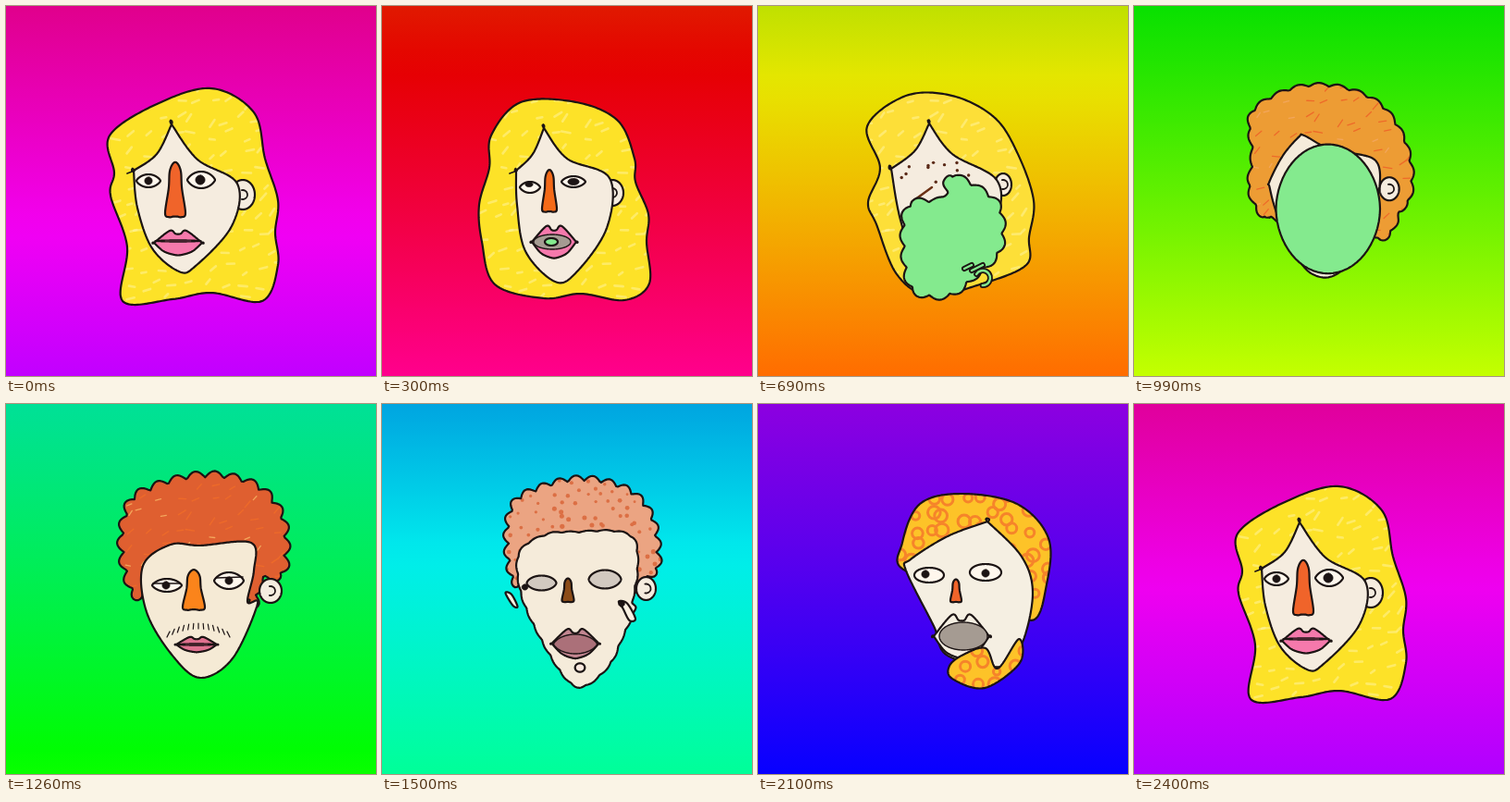
These frames come from a looping animation (400x400 px, 2430 ms). An HTML page with a canvas:

```html
<!DOCTYPE html>
<html lang="en">
<head>
<meta charset="utf-8">
<title>Shifting face</title>
<style>
html, body { margin: 0; height: 100%; overflow: hidden; }
canvas { display: block; width: 100vw; height: 100vh; }
</style>
</head>
<body>
<canvas width="400" height="400"></canvas>
<script>
const ctx = document.querySelector('canvas').getContext('2d');
const LOOP = 2430, LAST = 2400, STEP = 30, N = 300, TAU = 2 * Math.PI;
const INK = '#1c1414', SKIN = '#f5ecdf', YELLOW = '#fde228', WHITE = '#fff7ed', PINK = '#f579ac',
  GREY = '#a59b92', GREEN = '#84ea8e', GOLD = '#fdc328', ORANGE = '#f0642a';

const lerp = (a, b, k) => a + (b - a) * k;
const mix = (a, b, k) => a.map((v, i) => lerp(v, b[i], k));
const range = (n, f) => Array.from({ length: n }, (_, i) => f(i));

let seed = 7;
const random = () => (seed = seed * 16807 % 2147483647) / 2147483647;

// ---- Curves

function spline(p) {
  const n = p.length;
  return p.flatMap((b, i) => {
    const a = p[(i + n - 1) % n], c = p[(i + 1) % n], d = p[(i + 2) % n];
    return range(12, k => {
      const s = k / 12;
      return b.map((v, j) => v + .5 * s * (c[j] - a[j] +
        s * (2 * a[j] - 5 * v + 4 * c[j] - d[j] + s * (3 * (v - c[j]) + d[j] - a[j]))));
    });
  });
}

// N evenly spaced points from above the middle, with optional scallops along the edge
function shape(color, curve, bumps = 0, size = 0) {
  const middle = j => {
    const v = curve.map(p => p[j]);
    return (Math.min(...v) + Math.max(...v)) / 2;
  };
  const center = [middle(0), middle(1)];
  const off = p => p[1] < center[1] ? Math.abs(p[0] - center[0]) : Infinity;
  const start = curve.reduce((best, p, i) => off(p) < off(curve[best]) ? i : best, 0);
  const p = [...curve.slice(start), ...curve.slice(0, start + 1)];
  const dist = [0];
  for (let i = 1; i < p.length; i++)
    dist.push(dist[i - 1] + Math.hypot(p[i][0] - p[i - 1][0], p[i][1] - p[i - 1][1]));
  let j = 0;
  const even = range(N, i => {
    const d = i / N * dist.at(-1);
    while (dist[j + 1] < d) j++;
    return mix(p[j], p[j + 1], (d - dist[j]) / (dist[j + 1] - dist[j] || 1));
  });
  const points = even.map(([x, y], i) => {
    const a = even.at(i - 2), b = even[(i + 2) % N];
    const dx = b[0] - a[0], dy = b[1] - a[1];
    const k = size * (Math.abs(Math.sin(Math.PI * bumps * i / N)) - .5) / (Math.hypot(dx, dy) || 1);
    return [x + dy * k, y - dx * k];
  });
  return { color: [1, 3, 5].map(i => parseInt(color.slice(i, i + 2), 16)), points, center };
}

// Closed curve through "x,y" pairs; a repeated pair makes a corner
const through = (color, pairs, ...bumps) =>
  shape(color, spline(pairs.split(' ').map(pair => pair.split(',').map(Number))), ...bumps);
const oval = (color, x, y, rx, ry, pinch = 0) => shape(color, range(64, i => {
  const a = i / 64 * TAU, s = Math.sin(a);
  return [x + rx * Math.cos(a), y + ry * s * Math.abs(s) ** pinch];
}));
const eye = (x, y, rx, ry) => oval(WHITE, x, y, rx, ry, .5);
const pupil = (x, y, rx, ry) => oval(INK, x, y, rx, ry);

// Left-right symmetric shape from its right half, top to bottom
const mirrored = (color, half, x, y, w, h) => {
  const left = half.map(([u, v]) => [-u, v]).reverse();
  return shape(color, spline([...half, ...left].map(([u, v]) => [x + u * w, y + v * h])));
};
const nose = (color, ...box) => mirrored(color, [[.2, 0], [.55, .15], [.65, .45], [1, .9], [.6, .97], [.2, .96]], ...box);
const lips = (color, ...box) => mirrored(color, [[.1, -.75], [.35, -1], [1, 0], [1, 0], [.6, .7], [.15, 1]], ...box);

// ---- Parts in drawing order, each with its poses by time; null is shrunk away

const parts = {
  hair: {
    0: through(YELLOW, '163,106 222,89 268,115 280,165 294,210 291,245 294,280 277,319 222,310 180,317 126,319 131,260 113,205 117,180 112,140'),
    300: through(YELLOW, '150,104 210,104 255,124 273,165 274,190 288,225 286,255 289,300 262,318 215,311 175,316 122,301 108,255 105,215 116,175 118,140'),
    690: through('#fddf38', '160,97 210,97 255,120 280,158 298,210 293,250 290,280 240,301 185,313 150,290 128,236 119,212 132,175 118,130'),
    1260: through('#df5f30', '145,95 210,76 268,86 298,118 304,160 298,186 278,190 271,215 261,214 250,190 160,185 150,206 136,204 124,160 128,120', 28, 7),
    1740: through('#f6e9d4', '149,110 168,96 218,84 268,101 290,135 296,185 270,190 160,185 146,178 144,145', 28, 5),
    2100: through(GOLD, '156,150 175,108 220,97 280,108 314,145 312,195 296,234 250,200 159,180')
  },
  ear: {
    0: oval(SKIN, 256, 204, 13, 16), 300: oval(SKIN, 249, 202, 12, 14), 690: oval(SKIN, 265, 193, 9, 12),
    1260: oval(SKIN, 286, 202, 12, 13), 1740: oval(SKIN, 285, 197, 9, 12), 2100: null
  },
  face: {
    0: through(SKIN, '179,128 179,128 207,166 250,192 244,238 205,281 187,287 158,262 142,218 138,178 138,178 163,160'),
    300: through(SKIN, '175,132 175,132 200,165 246,186 243,240 210,288 187,298 155,265 146,215 145,178 145,178 163,160'),
    690: through(SKIN, '185,127 185,127 210,160 258,188 258,230 225,285 180,300 155,235 144,176 144,176 170,156'),
    1260: through('#f5ead5', '210,153 265,150 268,180 261,214 272,216 245,275 210,296 180,272 152,225 148,175 178,152'),
    1740: through(SKIN, '200,125 265,128 284,165 280,215 258,262 245,292 212,318 194,295 172,245 150,190 150,145', 26, 3),
    2100: through('#f5efe2', '248,127 248,127 285,165 297,205 285,260 262,284 205,272 190,240 160,180 165,168 205,143')
  },
  eyeL: {
    0: eye(154, 189, 13, 7), 300: eye(160, 196, 11, 6), 690: null, 1260: eye(174, 196, 16, 7),
    1740: oval(GREY, 171, 191, 16, 9), 2100: oval(WHITE, 185, 185, 16, 8)
  },
  eyeR: {
    0: eye(211, 188, 15, 9), 300: eye(207, 190, 13, 6), 690: null, 1260: eye(241, 191, 16, 9),
    1740: oval(GREY, 241, 188, 19, 11), 2100: oval(WHITE, 246, 182, 17, 9)
  },
  ballL: { 1260: null, 1740: through('#f9f1e2', '127,197 140,200 153,226 143,224'), 2100: null },
  ballR: { 1260: null, 1740: through('#f9f1e2', '247,203 265,207 283,240 270,244 256,218'), 2100: null },
  pupilL: {
    0: pupil(154, 189, 4, 4), 300: pupil(159, 193, 4, 2.5), 690: null, 1260: pupil(173, 196, 4, 4),
    1740: pupil(136, 200, 2.5, 2), 2100: pupil(181, 184, 4, 4)
  },
  pupilR: {
    0: pupil(210, 188, 5, 5), 300: pupil(207, 190, 6, 3.5), 690: null, 1260: pupil(241, 191, 4, 4),
    1740: pupil(277, 241, 2.5, 2), 2100: pupil(246, 183, 4, 4)
  },
  nose: {
    0: nose(ORANGE, 183, 170, 11, 60), 300: nose('#f46a18', 181, 178, 8, 46), 690: null,
    1260: nose('#fb841b', 203, 180, 12, 44), 1740: nose(INK, 199, 198, 1, 8), 2100: nose(ORANGE, 214, 190, 6, 25)
  },
  lips: {
    0: lips(PINK, 186, 256, 26, 13), 300: lips(PINK, 186, 255, 24, 17), 690: null,
    1260: lips('#e0718f', 206, 260, 22, 8), 1740: lips(GREY, 212, 258, 29, 23), 2100: lips('#f5efe2', 220, 251, 30, 23)
  },
  mouth: {
    0: oval('#c9507f', 186, 254, 25, 1), 300: oval(GREY, 184, 255, 20, 8), 690: null,
    1260: oval('#b04560', 206, 260, 21, 1), 1740: oval(GREY, 212, 259, 26, 20), 2100: oval(GREY, 222, 251, 26, 15)
  },
  toothL: { 1500: null, 1740: oval(SKIN, 200, 242, 3.5, 6), 1980: null },
  toothR: { 1500: null, 1740: oval(SKIN, 211, 241, 3.5, 6), 1980: null },
  tongue: {
    1380: null, 1740: oval('#fbe9df', 214, 285, 16, 14),
    2100: through(GOLD, '207,283 222,271 246,264 259,286 282,254 283,280 245,307 210,297'), 2340: null
  },
  blob: {
    150: null, 300: oval(GREEN, 183, 255, 7, 4),
    690: through(GREEN, '203,190 214,183 255,208 265,232 262,265 238,290 205,314 165,305 156,245 165,213 200,208', 17, 5),
    900: oval(GREEN, 212, 195, 84, 110), 1140: oval(GREEN, 206, 260, 10, 3), 1200: null
  }
};

// Every part rests in its first pose until the loop restarts
const tracks = Object.entries(parts).map(([name, poses]) => {
  const keys = Object.entries(poses).map(([t, pose]) => ({ t: +t, pose }));
  return { name, keys: [...keys, { t: LAST + keys[0].t, pose: keys[0].pose }] };
});

function shapeAt(keys, t) {
  if (t < keys[0].t) t += LAST;
  const i = keys.findIndex(key => key.t > t);
  if (i < 1) return keys.at(-1).pose;
  const from = keys[i - 1], to = keys[i], a = from.pose, b = to.pose;
  const k = (t - from.t) / (to.t - from.t);
  if (a && b) return {
    color: mix(a.color, b.color, k),
    center: mix(a.center, b.center, k),
    points: a.points.map((p, j) => mix(p, b.points[j], k))
  };
  const only = a || b, size = a ? 1 - k : k;
  return only && size > .04 && { ...only, points: only.points.map(p => mix(only.center, p, size)) };
}

// ---- Marks and details

function line(color, width, x, y, x2, y2) {
  ctx.strokeStyle = color;
  ctx.lineWidth = width;
  ctx.beginPath();
  ctx.moveTo(x, y);
  ctx.lineTo(x2, y2);
  ctx.stroke();
}

function ring(color, width, x, y, r, from = 0, to = TAU) {
  ctx.strokeStyle = color;
  ctx.lineWidth = width;
  ctx.beginPath();
  ctx.arc(x, y, r, from, to);
  ctx.stroke();
}

function dot(color, x, y, r) {
  ctx.fillStyle = color;
  ctx.beginPath();
  ctx.arc(x, y, r, 0, TAU);
  ctx.fill();
}

const flecks = range(168, i => ({
  x: 106 + i % 12 * 18 + random() * 14, y: 78 + Math.floor(i / 12) * 18 + random() * 14,
  turn: random() * 1.2 - 1, size: .6 + random() * .6
}));
const freckles = range(11, () => [150 + random() * 78, 169 + random() * 26]);

// Crayon marks inside the current shape
function texture(path, name, t) {
  ctx.save();
  ctx.clip(path);
  for (const { x, y, turn, size } of flecks) {
    const dx = 4 * size * Math.cos(turn), dy = 4 * size * Math.sin(turn);
    if (t >= 1920 && t < 2220) ring('#f6842a', 3, x, y, 6 * size);
    else if (t >= 1500 && t < 1920) {
      for (const k of [-1, 1]) dot(name === 'tongue' ? '#d9333d' : '#dc6f44', x + k * 4, y + k * 4, 2.2 * size);
    } else if (t >= 960 && t < 1500) line(size < .75 ? '#f3a65b' : '#ee6a29', 1.3, x - dx, y - dy, x + dx, y + dy);
    else line('rgba(255,246,165,.5)', 2.6, x - dx, y - dy, x + dx, y + dy);
  }
  ctx.restore();
}

function details(t) {
  if (t < 510 || t >= 2250) {
    const shift = 7 * Math.min(1, t % LAST / 300) * (t < 510);
    line(INK, 1.8, 131 + shift, 181, 139 + shift, 178);
  }
  if (t >= 1080 && t < 1500) {
    for (let u = -1; u <= 1; u += 1 / 6) {
      const x = 208 + u * 31, y = 237 + u * u * 9;
      line(INK, 1.2, x, y, x + u * 3, y + 6);
    }
    line(INK, 1.6, 159, 194, 188, 194);
    line(INK, 1.6, 227, 188, 256, 187);
  }
  if (t >= 510 && t < 900) {
    for (const [x, y] of freckles) dot('#5b2a18', x, y, 1.7);
    line('#6a3014', 2.5, 166, 212, 188, 196);
  }
}

function tendrils(t) {
  if (t < 600 || t >= 780) return;
  for (const [color, width] of [[INK, 6], [GREEN, 2.5]]) {
    for (const k of [0, 1]) line(color, width, 223 + k * 8, 284 + k * 2, 231 + k * 12, 280);
    ring(color, width, 243, 294, 8, -2.6, 1.6);
  }
}

// ---- Picture

function sky() {
  return t => {
    const gradient = ctx.createLinearGradient(0, 0, 0, 400);
    for (let y = 0; y <= 1; y += 1 / 16) {
      const phase = (t - 270 * y) / LOOP;
      const hue = 328 + 360 * phase - 6 * Math.cos(TAU * (phase - .07));
      gradient.addColorStop(y, `hsl(${(hue + 360) % 360} 100% ${44 + 6 * y}%)`);
    }
    return gradient;
  };
}
const skyAt = sky();

function draw(t) {
  ctx.fillStyle = skyAt(t);
  ctx.fillRect(0, 0, 400, 400);
  ctx.lineJoin = ctx.lineCap = 'round';

  for (const { name, keys } of tracks) {
    if (name === 'blob') details(t);
    const now = shapeAt(keys, t);
    if (!now) continue;
    const path = new Path2D();
    now.points.forEach(p => path.lineTo(...p));
    path.closePath();
    ctx.fillStyle = `rgb(${now.color.map(Math.round)})`;
    ctx.fill(path);
    if (name === 'hair' || name === 'tongue' && t >= 1500) texture(path, name, t);
    ctx.strokeStyle = INK;
    ctx.lineWidth = name.startsWith('pupil') ? 1 : name === 'mouth' ? 1.4 : 2.2;
    ctx.stroke(path);
    if (name === 'ear') ring(INK, 1.8, ...now.center, 5, -1.8, 1.8);
  }
  tendrils(t);
}

function tick() {
  draw(Math.floor(performance.now() % LOOP / STEP) * STEP);
  requestAnimationFrame(tick);
}
tick();
</script>
</body>
</html>
```
